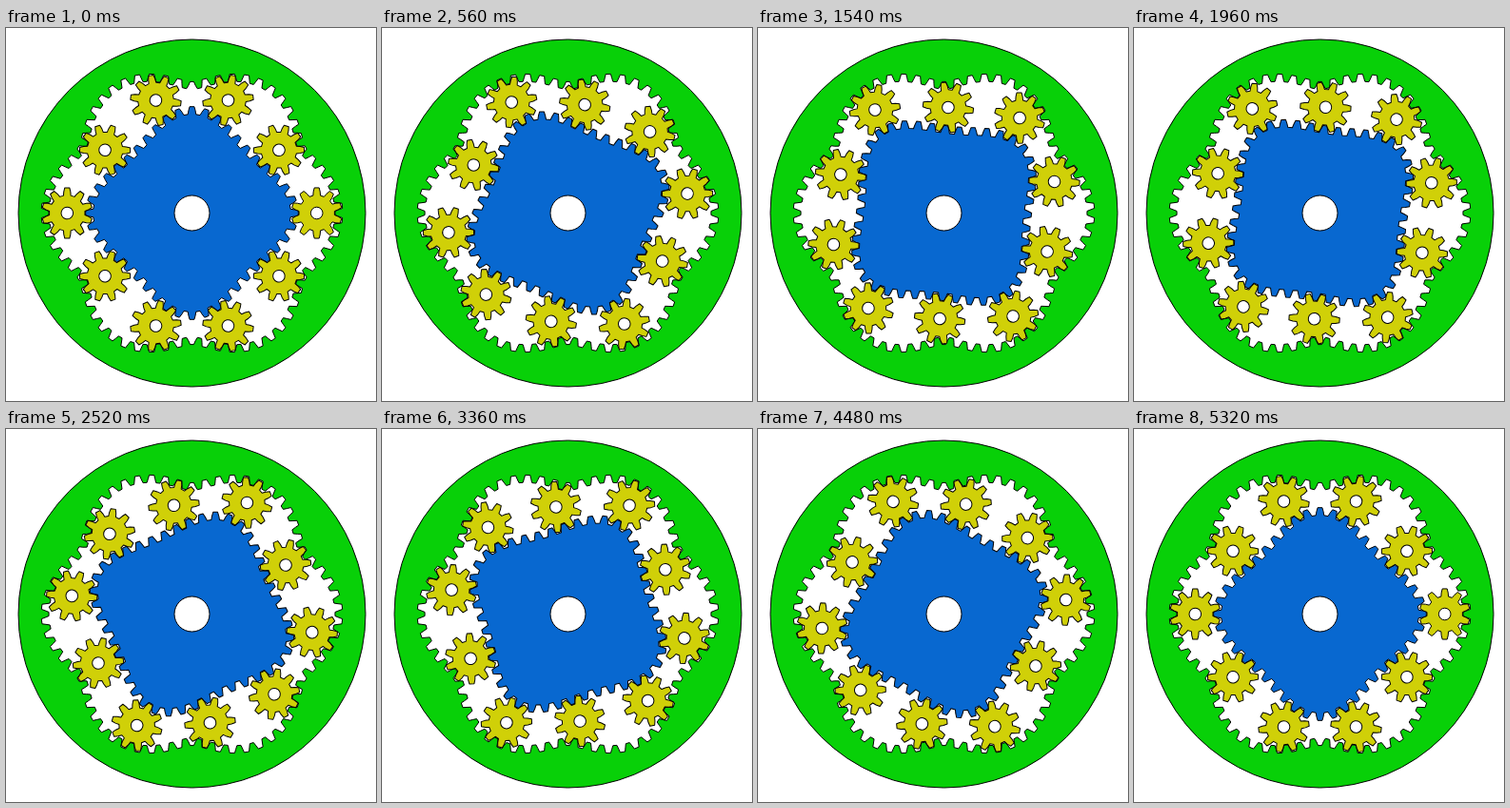
These frames come from a looping animation (389x392 px, 5.46 s). An HTML page with a canvas:

```html
<!DOCTYPE html>
<html lang="en">
<head>
<meta charset="utf-8">
<title>Non-circular planetary gear</title>
<style>
  html, body { margin: 0; width: 100%; height: 100%; overflow: hidden; background: #fff; }
  canvas { display: block; }
</style>
</head>
<body>
<canvas id="stage" width="389" height="392"></canvas>
<script>
const ctx = document.getElementById('stage').getContext('2d');
const { PI, sin, cos, atan, atan2, hypot } = Math;
const TAU = 2 * PI;
const DEG = PI / 180;

const CENTER = [195.5, 194.5];
const GREEN = '#08d008', BLUE = '#0868d0', YELLOW = '#d0d008';
const RING_TEETH = 66, SUN_TEETH = 44, PLANET_TEETH = 10, PLANETS = 10;
const PITCH = TAU / PLANET_TEETH;
const TIP = 3.7, ROOT = 4.2;
const STEP_MS = 140, STEPS = 39;

// Path of the planet centres around the fixed ring: six lobes.
const radius = a => 121.3 + 10.2 * cos(6 * a) - 0.3 * cos(12 * a);
const slope = a => -61.2 * sin(6 * a) + 3.6 * sin(12 * a);

const SAMPLES = 3600;
const dA = TAU / SAMPLES;

function planetRadius() {
  let length = 0;
  for (let i = 0; i < SAMPLES; i++) length += hypot(radius(i * dA), slope(i * dA)) * dA;
  return length / (TAU * (RING_TEETH / PLANET_TEETH - 1));
}
const P = planetRadius();

// Roll one planet around the ring; the contact points on ring and sun
// lie on one line through the centre, which gives the sun's rotation.
function rollPlanet() {
  const rows = [];
  let roll = 0, turn = 0, last = null;
  for (let i = 0; i <= SAMPLES; i++) {
    const a = i * dA, r = radius(a);
    const normal = a - atan(slope(a) / r);
    const x = r * cos(a), y = r * sin(a);
    const ringX = x + P * cos(normal), ringY = y + P * sin(normal);
    const ray = atan2(ringY, ringX);
    const skew = atan2(sin(ray - normal), cos(ray - normal));
    const chord = 2 * P * cos(skew);
    const sunR = hypot(ringX, ringY) - chord;
    const ratio = chord / sunR;
    if (last) {
      const dRoll = hypot(ringX - last.ringX, ringY - last.ringY) / P;
      roll += dRoll;
      turn += (dRoll - (normal - last.normal)) * (ratio + last.ratio) / 2;
    }
    last = { x, y, normal, ringX, ringY, ray, skew, sunR, ratio, roll, turn };
    rows.push(last);
  }
  const rollFix = RING_TEETH * PITCH / roll;
  const turnFix = 5 * PI / turn;
  for (const row of rows) {
    row.roll *= rollFix;
    row.turn *= turnFix;
    row.spin = row.normal - row.roll;
    row.sunRoll = row.roll + 2 * row.skew;
    row.sunX = row.sunR * cos(row.ray - row.turn);
    row.sunY = row.sunR * sin(row.ray - row.turn);
    row.sunNormal = row.normal + 2 * row.skew - row.turn;
  }
  return rows;
}
const rows = rollPlanet();

function lookup(key, value, names) {
  let lo = 0, hi = rows.length - 1;
  while (hi - lo > 1) {
    const mid = (lo + hi) >> 1;
    if (rows[mid][key] <= value) lo = mid; else hi = mid;
  }
  const a = rows[lo], b = rows[hi];
  const f = (value - a[key]) / (b[key] - a[key]);
  return names.map(n => a[n] + (b[n] - a[n]) * f);
}

// Tooth outline: position in pitches, height from the pitch line.
const TOOTH = [[-0.33, -ROOT], [-0.25, -0.3], [-0.15, TIP], [0.15, TIP], [0.25, -0.3], [0.33, -ROOT]];

function gearPath(teeth, first, pointAt) {
  const path = new Path2D();
  for (let j = 0; j < teeth; j++) {
    for (const [u, h] of TOOTH) {
      const place = (j + first + u + teeth) % teeth;
      path.lineTo(...pointAt(place * PITCH, h));
    }
  }
  path.closePath();
  return path;
}

// Ring and sun carry a tooth on each lobe, so the planets start on a gap.
const ringPath = gearPath(RING_TEETH, 0, (s, h) => {
  const [x, y, n] = lookup('roll', s, ['ringX', 'ringY', 'normal']);
  return [x - h * cos(n), y - h * sin(n)];
});
const sunPath = gearPath(SUN_TEETH, 0, (s, h) => {
  const [x, y, n] = lookup('sunRoll', s, ['sunX', 'sunY', 'sunNormal']);
  return [x + h * cos(n), y + h * sin(n)];
});
const planetPath = gearPath(PLANET_TEETH, 0.5, (s, h) => [(P + h) * cos(s), (P + h) * sin(s)]);

function circle(r) {
  const path = new Path2D();
  path.arc(0, 0, r, 0, TAU);
  return path;
}
const rim = circle(182.5), bore = circle(18.5), pin = circle(6.3);

function paint(path, color) {
  ctx.fillStyle = color;
  ctx.fill(path);
  ctx.stroke(path);
}

function placed(x, y, angle, draw) {
  ctx.save();
  ctx.translate(x, y);
  ctx.rotate(angle);
  draw();
  ctx.restore();
}

// Slightly uneven drive: three sun turns per loop.
function sunTurn(step) {
  const sway = k => {
    const w = TAU * k / (STEPS - 1);
    return sin(w * (step - 16)) + sin(w * 16);
  };
  const carrier = 432 * step / (STEPS - 1) + 2.55 * sway(1) + 0.5 * sway(2) + 0.556 * sway(3);
  return 2.5 * carrier * DEG;
}

function draw(step) {
  const turn = sunTurn(step);
  ctx.setTransform(1, 0, 0, 1, 0, 0);
  ctx.fillStyle = '#fff';
  ctx.fillRect(0, 0, 389, 392);
  ctx.setTransform(1, 0, 0, -1, ...CENTER);
  ctx.strokeStyle = '#000';
  ctx.lineWidth = 1;
  ctx.lineJoin = 'round';
  paint(rim, GREEN);
  paint(ringPath, '#fff');
  placed(0, 0, turn, () => paint(sunPath, BLUE));
  paint(bore, '#fff');
  for (let k = 0; k < PLANETS; k++) {
    const [x, y, spin] = lookup('turn', (turn + k * PI / 2) % (5 * PI), ['x', 'y', 'spin']);
    placed(x, y, spin, () => {
      paint(planetPath, YELLOW);
      paint(pin, '#fff');
    });
  }
}

const start = performance.now();
let shown = -1;
function tick() {
  const step = Math.floor((performance.now() - start) / STEP_MS) % STEPS;
  if (step !== shown) draw(shown = step);
  requestAnimationFrame(tick);
}
tick();
</script>
</body>
</html>
```
